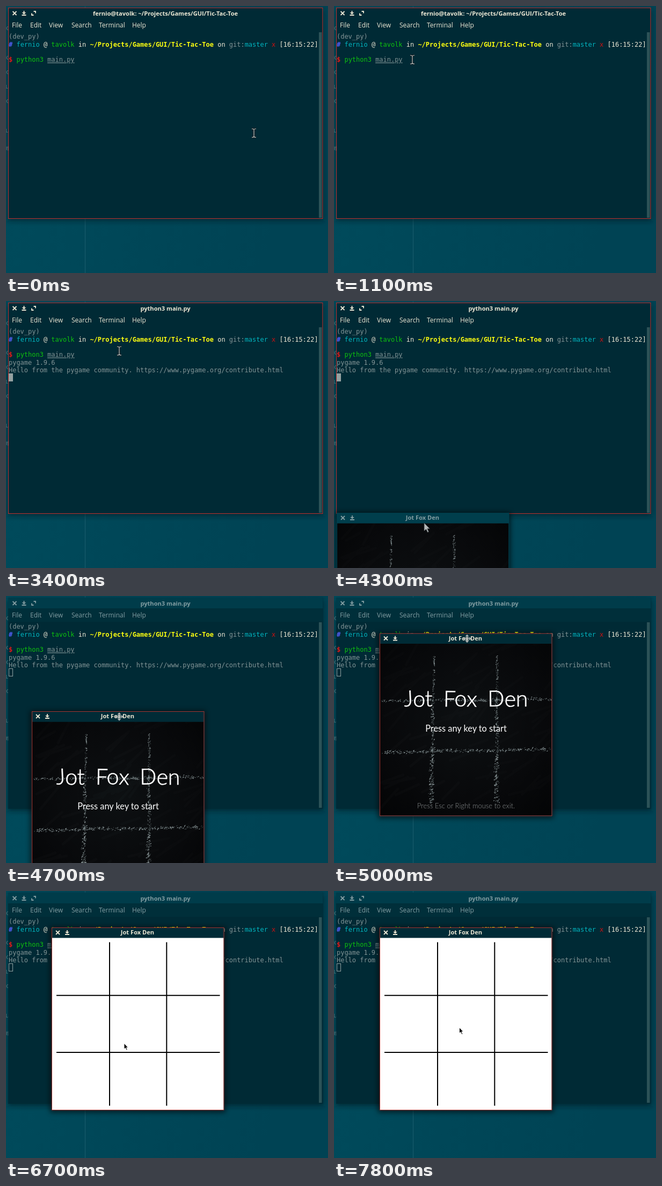
Animation, 600 px wide and 498 px high, one loop 8000 ms. Source, as an HTML page:

```html
<!DOCTYPE html>
<html lang="en">
<head>
<meta charset="utf-8">
<title>Terminal game launch</title>
<style>
  html, body { margin: 0; width: 600px; height: 498px; overflow: hidden; background: #00475a; }
  svg { display: block; }
  text { white-space: pre; }
  .mono { font: 11.97px "DejaVu Sans Mono", monospace; fill: #839496; }
  .ui { font: 12px "Open Sans", "Noto Sans", sans-serif; }
  .title { font: 700 11.1px "Open Sans", "Noto Sans", sans-serif; text-anchor: middle; }
  .chalk { font-family: Lato, sans-serif; text-anchor: middle; fill: #fff; }
  .b { font-weight: 700; }
  .icon { fill: none; stroke-width: 1.8; }
</style>
</head>
<body>
<svg id="stage" width="600" height="498" viewBox="0 0 600 498">
  <defs>
    <linearGradient id="desk" x2="1" y2="0.3">
      <stop offset="0" stop-color="#004c5d"/><stop offset="1" stop-color="#004354"/>
    </linearGradient>
    <radialGradient id="slate" cx=".5" cy=".45" r=".75">
      <stop offset="0" stop-color="#0d1012"/><stop offset=".6" stop-color="#08090b"/><stop offset="1" stop-color="#030405"/>
    </radialGradient>
    <filter id="blur" x="-10%" y="-10%" width="120%" height="120%"><feGaussianBlur stdDeviation="5"/></filter>
    <clipPath id="inside"><rect x="1" y="19.5" width="319.5" height="320.5"/></clipPath>
    <g id="cross"><path d="M-3.5-3.5 3.5 3.5M3.5-3.5-3.5 3.5"/></g>
    <g id="down"><path d="M0-4.5V0M-1.6-.6H1.6L0 1ZM-4 3.5H4"/></g>
    <g id="grow"><path d="M0-3.5H3.5V0M-3.5 0V3.5H0"/></g>
  </defs>

  <rect width="600" height="498" fill="url(#desk)"/>
  <path d="M147.5 0V498" stroke="#1c5d6d" stroke-width="1"/>
  <g id="behind" class="ui" fill="#6f8d94" text-anchor="end"></g>

  <g id="term">
    <rect x="3" y="6" width="589" height="395" fill="#00141a" opacity=".55" filter="url(#blur)"/>
    <rect x="4" y="3" width="586.5" height="394" fill="#002b36" opacity=".975"/>
    <rect id="termBar" x="4" y="3" width="586.5" height="20" fill="#003c4a"/>
    <rect id="termMenu" x="4" y="23" width="586.5" height="25" fill="#002f3a"/>
    <rect x="583" y="49" width="5.5" height="346" fill="#2c5257"/>
    <g id="termChrome">
      <g class="icon">
        <use href="#cross" x="16" y="13.5"/><use href="#down" x="33.5" y="13.5"/><use href="#grow" x="51.5" y="13.5"/>
      </g>
      <text id="termTitle" class="title" x="297" y="17.5" stroke="none"></text>
      <g id="menu" class="ui" stroke="none"></g>
    </g>
    <g class="mono">
      <text x="5" y="61">(dev_py)</text>
      <text x="5" y="76" fill="#eee8d5"><tspan class="b" fill="#5560ff">#</tspan> <tspan fill="#00b5c0">fernio</tspan> @ <tspan fill="#0ec20e">tavolk</tspan> in <tspan class="b" fill="#ffff10">~/Projects/Games/GUI/Tic-Tac-Toe</tspan> on <tspan fill="#839496">git:</tspan><tspan fill="#00b5c0">master</tspan> <tspan fill="#d01010">x</tspan> [16:15:22]</text>
      <text x="5" y="104.4"><tspan class="b" fill="#e01818">$</tspan> <tspan fill="#0ec20e">python3</tspan> <tspan text-decoration="underline">main.py</tspan></text>
      <g id="output">
        <text x="5" y="118.6">pygame 1.9.6</text>
        <text x="5" y="133">Hello from the pygame community. https://www.pygame.org/contribute.html</text>
      </g>
    </g>
    <rect id="caret" width="7" height="14" stroke="#93a1a1"/>
    <rect id="termEdge" x="4.5" y="3.5" width="585.5" height="393" fill="none" stroke="#c4302e"/>
  </g>

  <g id="game">
    <rect x="-3" y="-1" width="327" height="346" fill="#000" opacity=".6" filter="url(#blur)"/>
    <rect id="gameBar" width="321.5" height="341"/>
    <g id="gameChrome">
      <g class="icon"><use href="#cross" x="11.5" y="9.5"/><use href="#down" x="29" y="9.5"/></g>
      <text class="title" x="160" y="13.4" stroke="none">Jot Fox Den</text>
    </g>
    <g id="intro" clip-path="url(#inside)">
      <rect x="1" y="19.5" width="319.5" height="320.5" fill="url(#slate)"/>
      <g id="smudge" stroke="#8a979c" stroke-width="5" stroke-linecap="round" opacity=".018"></g>
      <g id="lines" fill="none"></g>
      <text class="chalk" x="161" y="136.5" font-size="41" font-weight="300" word-spacing="9" stroke="#fff" stroke-width=".7" rotate="-2 2 0 0 1 -2 2 0 -1 2 0">Jot Fox Den</text>
      <text class="chalk" x="161" y="183.3" font-size="16.3">Press any key to start</text>
      <text class="chalk" x="161" y="326.5" font-size="13" font-weight="300" style="fill:#8e9293">Press Esc or Right mouse to exit.</text>
    </g>
    <g id="board">
      <rect x="1" y="19.5" width="319.5" height="320.5" fill="#fff"/>
      <path d="M108 27.5V332.5M214.3 27.5V332.5M9 126.7H313.5M9 233H313.5" stroke="#000" stroke-width="2"/>
    </g>
    <rect id="gameEdge" x=".5" y=".5" width="320.5" height="340" fill="none" stroke="#a83633"/>
  </g>

  <g id="mouse">
    <g id="beam" fill="none">
      <path id="beamLine" d="M-4-8Q0-8 0-6Q0-8 4-8M0-6V6M-4 8Q0 8 0 6Q0 8 4 8"/>
    </g>
    <path id="pointer" d="M0 0V15L3.6 11.7 6.3 17.5 8.6 16.4 6 10.8H10.5Z" fill="#b4b8b8" stroke="#30383a" stroke-width=".8"/>
    <path id="grab" d="M0-6V6M-6 0H6M-2.5-4 0-6.5 2.5-4M-2.5 4 0 6.5 2.5 4M-4-2.5-6.5 0-4 2.5M4-2.5 6.5 0 4 2.5" fill="none" stroke="#b4b8b8" stroke-width="1.6"/>
    <path id="arrow" d="M.5.5V11.5L3 9.3 5 13.5 6.8 12.7 4.9 8.6H8Z" fill="#000" stroke="#fff" stroke-width="1"/>
  </g>
</svg>
<script>
const LOOP = 8000, STEP = 100;
const $ = id => document.getElementById(id);
const set = (id, attrs) => { for (const k in attrs) $(id).setAttribute(k, attrs[k]); };
const show = (id, on) => $(id).setAttribute('visibility', on ? 'visible' : 'hidden');
const move = (id, x, y) => $(id).setAttribute('transform', `translate(${x.toFixed(1)} ${y.toFixed(1)})`);

// time, x, y
const mousePath = [
  [0, 462, 237], [100, 448, 233], [300, 330, 190], [500, 140, 118], [600, 35, 95], [700, 48, 90],
  [900, 122, 102], [1100, 146, 100], [1200, 146, 100], [1400, 576, 87], [1700, 25, 101],
  [1900, 25, 101], [2300, 211, 93], [3600, 211, 93], [3900, 230, 220], [4200, 172, 398],
  [4300, 168, 414], [4500, 168, 405], [5100, 248, 78], [5400, 366, 256], [5500, 362, 262],
  [5600, 362, 262], [5800, 218, 272], [6000, 218, 272], [6200, 259, 265], [6600, 259, 265],
  [6800, 180, 302], [6900, 149, 281], [7100, 149, 281], [7300, 260, 246], [7400, 260, 246],
  [7600, 287, 154], [7800, 233, 254]
];
const gamePath = [
  [4500, 5, 395], [4600, 18, 335], [4700, 48, 215], [4800, 76, 118],
  [4900, 84, 78], [5000, 85, 69.5], [5100, 85, 68]
];

function along(path, t) {
  let i = path.findIndex(p => p[0] > t);
  if (i < 0) return path[path.length - 1].slice(1);
  if (i === 0) return path[0].slice(1);
  const [a, b] = [path[i - 1], path[i]];
  const u = (t - a[0]) / (b[0] - a[0]);
  return [1, 2].map(k => a[k] + (b[k] - a[k]) * u);
}

let seed = 7;
const rnd = () => (seed = (seed * 16807) % 2147483647) / 2147483647;
const spread = w => (rnd() + rnd() - 1) * w;

// Grainy chalk stroke: slanted flecks scattered around a straight line.
function chalk(x1, y1, x2, y2, w1, w2) {
  const len = Math.hypot(x2 - x1, y2 - y1), shades = ['', '', ''];
  const upright = Math.abs(y2 - y1) > Math.abs(x2 - x1);
  for (let i = 0; i < len * 1.15; i++) {
    const u = rnd(), w = w1 + (w2 - w1) * u, off = spread(w) + Math.sin(u * 13) * 0.8;
    const x = x1 + (x2 - x1) * u + (upright ? off : 0);
    const y = y1 + (y2 - y1) * u + (upright ? 0 : off);
    const size = 0.5 + rnd() * 0.5 * w;
    shades[i % 3] += `M${x.toFixed(1)} ${y.toFixed(1)}l${size.toFixed(1)} ${(-size * rnd()).toFixed(1)}`;
  }
  return shades.map((d, i) =>
    `<path d="${d}" stroke="${['#4d585a', '#6d797b', '#919d9f'][i]}" stroke-width="${0.9 + i * 0.1}"/>`).join('');
}

function build() {
  $('lines').innerHTML =
    chalk(101, 43, 95, 321, 2, 5.5) + chalk(218, 43, 217, 321, 2.5, 5.5) +
    chalk(3, 126, 319, 123.5, 3, 3.5) + chalk(4, 222, 318, 217, 4, 4);
  let s = '';
  for (let i = 0; i < 70; i++) {
    const x = rnd() * 320, y = 20 + rnd() * 320;
    s += `<path d="M${x} ${y}l${20 + rnd() * 40} ${-10 - rnd() * 30}"/>`;
  }
  $('smudge').innerHTML = s;
  $('menu').innerHTML = [['File', 11], ['Edit', 45], ['View', 80], ['Search', 122], ['Terminal', 173], ['Help', 235]]
    .map(([label, x]) => `<text x="${x}" y="39.5">${label}</text>`).join('');
  $('behind').innerHTML = [['c', 45], ['c', 100], ['c', 127], ['u', 154], ['c', 181], ['i', 208], ['u', 236], ['0t', 270]]
    .map(([label, y]) => `<text x="6" y="${y}">${label}</text>`).join('');
  const line = $('beamLine');
  const halo = line.cloneNode();
  halo.removeAttribute('id');
  set('beamLine', { stroke: '#c3c9c8', 'stroke-width': 1.2 });
  halo.setAttribute('stroke', '#10191c');
  halo.setAttribute('stroke-width', 3);
  $('beam').insertBefore(halo, line);
}

function draw(t) {
  const playing = t >= 4500;
  const started = t >= 3100, printed = t >= 3300, opened = t >= 3500;
  const lit = '#eee8d5', dim = '#839da2';

  $('termTitle').textContent = started ? 'python3 main.py' : 'fernio@tavolk: ~/Projects/Games/GUI/Tic-Tac-Toe';
  set('termChrome', { fill: playing ? dim : lit, stroke: playing ? dim : lit });
  show('termBar', playing);
  show('termMenu', playing);
  show('termEdge', !playing);
  show('output', printed);
  show('caret', t >= 2900);
  set('caret', {
    x: started ? 5.5 : 128.5,
    y: printed ? 135.5 : started ? 107.5 : 93.5,
    fill: playing ? 'none' : '#93a1a1'
  });

  const [gx, gy] = along(gamePath, t);
  move('game', gx, gy);
  $('game').style.display = opened ? '' : 'none';
  set('gameBar', { fill: playing ? '#002b36' : '#003e4c' });
  set('gameChrome', { fill: playing ? lit : dim, stroke: playing ? lit : dim });
  show('gameEdge', playing);
  show('intro', t < 6300);
  show('board', t >= 6300);

  const dragging = playing && t < 5200;
  const [mx, my] = dragging ? [gx + 163, gy + 10] : along(mousePath, t);
  move('mouse', mx, my);
  show('beam', !playing && my < 397);
  show('pointer', !playing && my >= 397);
  show('grab', dragging);
  show('arrow', t >= 5200);
}

build();
const start = performance.now();
function tick() {
  const t = (performance.now() - start) % LOOP;
  draw(Math.floor(t / STEP) * STEP);
  requestAnimationFrame(tick);
}
tick();
</script>
</body>
</html>
```
